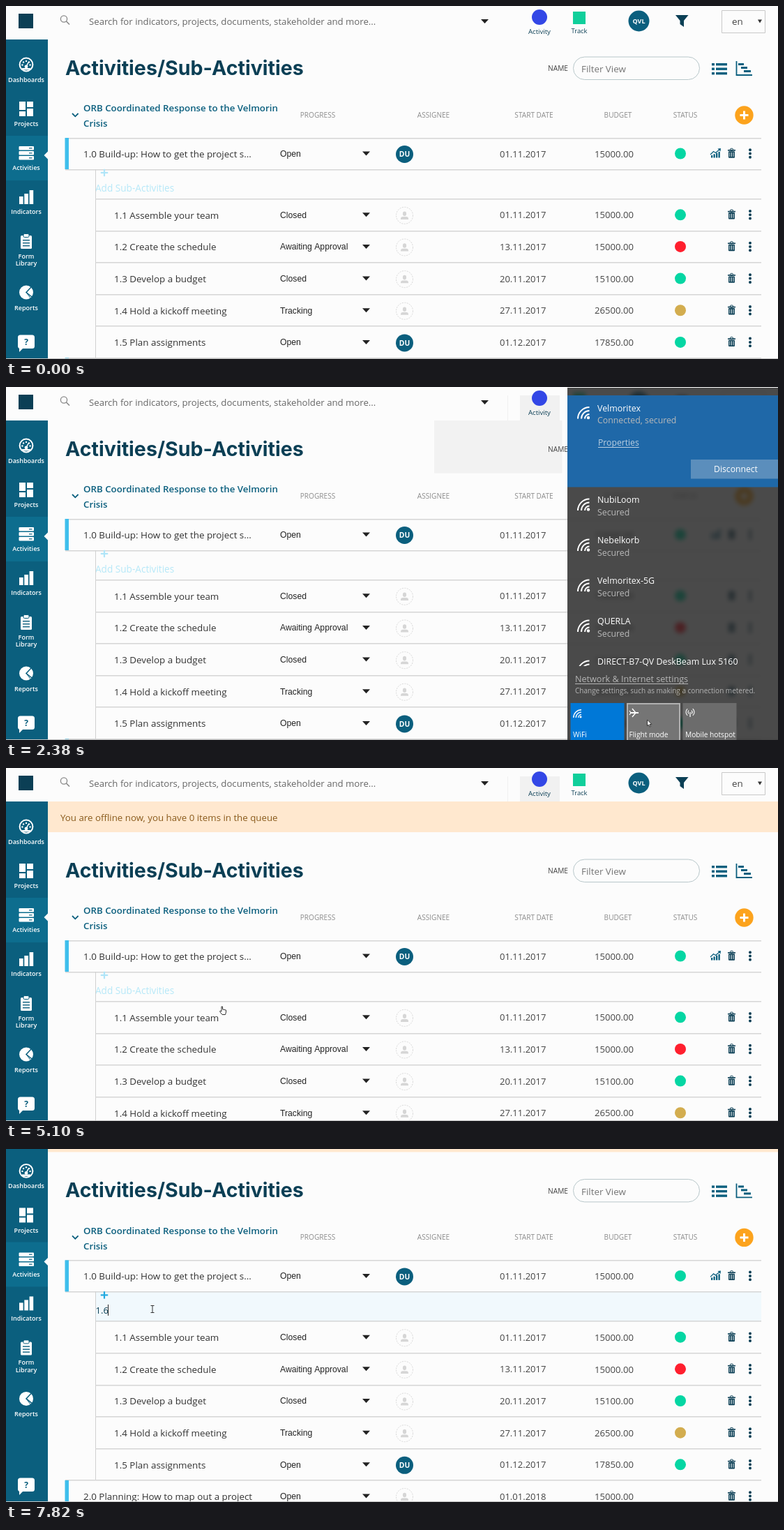
Recreate the animation shown at these times as an HTML page with a canvas. Size 1107 by 506 pixels, loop 8 s.

```html
<!DOCTYPE html>
<html lang="en">
<head>
<meta charset="utf-8">
<title>Activities</title>
<style>
html, body { margin: 0; width: 100%; height: 100%; overflow: hidden; background: #fcfcfc; }
canvas { display: block; }
</style>
</head>
<body>
<canvas id="stage" width="1107" height="506"></canvas>
<script>
const stage = document.getElementById('stage');
const c = stage.getContext('2d');
const SANS = '"Open Sans", "Noto Sans", sans-serif';
const ARIAL = '"Liberation Sans", Arial, sans-serif';
const TEAL = '#0b5f7e', NAVY = '#0b3f55', BG = '#fcfcfc', INK = '#333';
const GREEN = '#05d6a3', RED = '#ff1f2e', GOLD = '#d3ad4f';

// ---------- drawing helpers ----------
function rect(x, y, w, h, color) {
  c.fillStyle = color;
  c.fillRect(x, y, w, h);
}
function disc(x, y, r, color) {
  c.fillStyle = color;
  c.beginPath();
  c.arc(x, y, r, 0, 7);
  c.fill();
}
function ring(x, y, r, color, width = 1, from = 0, to = 2 * Math.PI) {
  c.strokeStyle = color;
  c.lineWidth = width;
  c.beginPath();
  c.arc(x, y, r, from, to);
  c.stroke();
}
function trace(points, x = 0, y = 0, k = 1) {
  c.beginPath();
  for (let i = 0; i < points.length; i += 2) c.lineTo(x + points[i] * k, y + points[i + 1] * k);
}
function poly(points, color, x, y, k) {
  trace(points, x, y, k);
  c.closePath();
  c.fillStyle = color;
  c.fill();
}
function line(points, color, width, x, y) {
  trace(points, x, y);
  c.strokeStyle = color;
  c.lineWidth = width;
  c.stroke();
}
function box(x, y, w, h, r, fill, stroke) {
  c.beginPath();
  c.roundRect(x, y, w, h, r);
  if (fill) { c.fillStyle = fill; c.fill(); }
  if (stroke) { c.strokeStyle = stroke; c.lineWidth = 1; c.stroke(); }
}
// y is the middle of the capitals
function text(s, x, y, size, color, weight = 400, align = 'left', font = SANS) {
  c.font = `${weight} ${size}px ${font}`;
  c.textAlign = align;
  c.fillStyle = color;
  c.fillText(s, x, y + size * .355);
}
function plus(x, y, r, color, width) {
  line([-r, 0, r, 0], color, width, x, y);
  line([0, -r, 0, r], color, width, x, y);
}
function badge(label, x, y, r, size) {
  disc(x, y, r, TEAL);
  text(label, x, y, size, '#fff', 700, 'center');
}
function underlined(s, x, y, size, color) {
  text(s, x, y, size, color);
  rect(x, Math.round(y + 6), c.measureText(s).width, 1, color);
}

// ---------- page ----------
function header(y, hover) {
  rect(0, y, 1107, 48, BG);
  rect(18, y + 11, 21, 21, NAVY);
  ring(83, y + 18.5, 4.6, '#888', 1.3);
  line([86.5, 22, 91, 26.5], '#888', 1.6, 0, y);
  text('Search for indicators, projects, documents, stakeholder and more...', 119, y + 22.5, 13.2, '#666');
  poly([681, 19, 692, 19, 686.5, 25], '#222', 0, y);
  if (hover) {
    rect(719, y + 12, 1, 36, '#f0f0f0');
    rect(737, y + 12, 57, 36, '#f1f1f1');
  }
  disc(765, y + 16, 11, '#3347e6');
  text('Activity', 765, y + 36.5, 9.6, NAVY, 400, 'center');
  rect(813, y + 8, 18, 18, '#10cf9b');
  text('Track', 822, y + 36, 9.4, NAVY, 400, 'center');
  badge('QVL', 907.5, y + 21.5, 15, 9);
  poly([960, 13, 978.5, 13, 972, 21, 972, 30, 966.5, 26, 966.5, 21], NAVY, 0, y);
  box(1026.5, y + 6.5, 62, 32, 0, null, '#c8c8c8');
  text('en', 1041, y + 22.5, 13.4, '#444');
  poly([1078, 19.5, 1084, 19.5, 1081, 24.5], '#333', 0, y);
}

function sidebar(y) {
  rect(0, Math.max(0, y + 48), 60, 506, TEAL);
  rect(0, y + 186, 60, 64, '#0d6d8e');
  poly([60, 208.5, 60, 219.5, 54.5, 214], BG, 0, y);
  const W = '#fff';
  ring(29, y + 84, 9.4, W, 2);
  for (let i = 0; i < 5; i++) {
    const a = Math.PI * (1 + i / 4);
    disc(29 + 5.6 * Math.cos(a), y + 84.5 + 5.6 * Math.sin(a), 1.2, W);
  }
  line([29, 87, 32, 81], W, 1.6, 0, y);
  disc(29, y + 87, 2.4, W);
  rect(23, y + 89, 12, 2.5, W);

  rect(19, y + 137, 9, 12, W);
  rect(30, y + 137, 9, 8, W);
  rect(19, y + 151, 9, 7, W);
  rect(30, y + 147, 9, 11, W);

  for (let i = 0; i < 3; i++) {
    box(18.5, y + 201 + i * 7, 21.5, 5.6, 1, W);
    rect(33, y + 203.2 + i * 7, 4.5, 1.2, TEAL);
  }

  rect(19, y + 273, 5.6, 11, W);
  rect(26.3, y + 269, 5.6, 15, W);
  rect(33.6, y + 264, 5.6, 20, W);

  box(21, y + 329, 16, 19, 1.5, W);
  box(25, y + 326.5, 8, 5, 1.5, W, TEAL);
  for (let i = 0; i < 3; i++) rect(24, y + 335 + i * 4, 10, 1.4, TEAL);

  disc(29, y + 410.5, 10, W);
  line([36, 403, 29, 410.5, 37, 417], TEAL, 1.5, 0, y);
  line([29, 410.5, 35, 418.5], TEAL, 1, 0, y);

  const labels = [['Dashboards', 105.5], ['Projects', 169], ['Activities', 232], ['Indicators', 295],
    ['Form', 358.5], ['Library', 369], ['Reports', 432.5]];
  for (const [s, at] of labels) text(s, 29, y + at, 9, W, 600, 'center');

  box(17, 471.5, 24, 19.5, 3.5, W);
  poly([19, 489, 26, 489, 19, 496], W);
  text('?', 29, 481.5, 12, TEAL, 700, 'center');
}

function trash(x, y) {
  rect(x - 5.5, y - 5, 11, 1.6, NAVY);
  box(x - 2, y - 6.7, 4, 3, 1, null, NAVY);
  box(x - 4.5, y - 2.7, 9, 9.4, 1, NAVY);
  for (let i = -1; i < 2; i++) rect(x + i * 2.6 - .5, y - 1.2, 1, 6.3, '#dfe6e9');
}
function nobody(x, y) {
  c.setLineDash([2, 1.5]);
  ring(x, y, 12, '#d8d8d8');
  c.setLineDash([]);
  c.fillStyle = '#d6d6d6';
  c.beginPath();
  c.ellipse(x, y - 2.5, 2.6, 3.3, 0, 0, 7);
  c.fill();
  box(x - 5.5, y + 1.8, 11, 3.8, [3, 3, 0, 0], '#d6d6d6');
}
function row(y, x, name, progress, date, budget, status, owned) {
  text(name, x, y, 13.4, INK);
  text(progress, 393, y - .4, 12.2, '#222', 400, 'left', ARIAL);
  poly([511, -3.5, 522, -3.5, 516.5, 2.5], '#222', 0, y);
  if (owned) badge('DU', 571.5, y + .5, 12.5, 10.3);
  else nobody(571.5, y + .5);
  text(date, 708, y, 13, '#444');
  text(budget, 844, y, 13.1, '#444');
  if (status) disc(967, y - .5, 8, status);
  trash(1040.5, y - 1);
  for (let i = -1; i < 2; i++) disc(1067, y - .5 + i * 5.3, 2, NAVY);
}

const subs = [
  ['1.1 Assemble your team', 'Closed', '01.11.2017', '15000.00', GREEN],
  ['1.2 Create the schedule', 'Awaiting Approval', '13.11.2017', '15000.00', RED],
  ['1.3 Develop a budget', 'Closed', '20.11.2017', '15100.00', GREEN],
  ['1.4 Hold a kickoff meeting', 'Tracking', '27.11.2017', '26500.00', GOLD],
  ['1.5 Plan assignments', 'Open', '01.12.2017', '17850.00', GREEN, true]
];

function content(y, n) {
  const rule = (x, at) => rect(x, Math.round(y + at), 1083 - x, 1.5, '#d6d6d6');
  text('Activities/Sub-Activities', 85, y + 88.5, 28.6, NAVY, 700, 'left', 'Inter, sans-serif');
  text('NAME', 777, y + 89.5, 10.2, '#444');
  box(813.5, y + 73, 181, 32.5, 16.2, BG, '#b8c7ca');
  text('Filter View', 825, y + 90.5, 13.4, '#757575');
  for (let i = 0; i < 3; i++) {
    rect(1012, y + 82 + i * 6.5, 4, 3.4, TEAL);
    rect(1018, y + 82 + i * 6.5, 16, 3.4, TEAL);
  }
  line([1047.5, 79, 1047.5, 99, 1070, 99], TEAL, 1.8, 0, y);
  for (let i = 0; i < 3; i++) rect(1050 + i * 4, y + 82 + i * 5, 8 + i, 3, TEAL);

  line([95, 154, 99.3, 158.3, 103.6, 154], TEAL, 1.8, 0, y);
  text('ORB Coordinated Response to the Velmorin', 111, y + 146.5, 13.3, TEAL, 600);
  text('Crisis', 111, y + 168.5, 13.3, TEAL, 600);
  const heads = [['PROGRESS', 447], ['ASSIGNEE', 613], ['START DATE', 757], ['BUDGET', 877.5], ['STATUS', 974]];
  for (const [s, x] of heads) text(s, x, y + 156.5, 10.1, '#8c8c8c', 400, 'center');
  disc(1058.5, y + 156.5, 13.2, '#fca31d');
  plus(1058.5, y + 156.5, 6, '#fff', 3);

  rule(85, 188.5);
  row(y + 212, 111, '1.0 Build-up: How to get the project s...', 'Open', '01.11.2017', '15000.00', GREEN, true);
  for (let i = 0; i < 4; i++) rect(1011 + i * 3.5, y + 214 - i * 1.7, 2.3, 3.5 + i * 1.7, TEAL);
  line([1010, 213, 1014.5, 208.5, 1017.5, 210.5, 1024, 205], TEAL, 1.3, 0, y);
  poly([1020.5, 204.5, 1025, 204, 1024.5, 208.5], TEAL, 0, y);

  // new sub-activity field
  const active = n >= 20;
  if (active) rect(128, y + 234, 955, 43, '#f1f9fd');
  rule(85, 233.5);
  plus(141, y + 239, 5.2, active ? '#22a9e0' : '#b0e5f8', 2.2);
  const typed = n < 22 ? '' : n < 23 ? '1.' : '1.6';
  if (typed) text(typed, 128.5, y + 261, 13, NAVY);
  else text('Add Sub-Activities', 128, y + 261, 13.6, active ? '#7fcdec' : '#b6e8f8');
  if (n >= 21) rect([128.5, 138.5, 146][n - 21], y + 252.5, 1, 16, '#222');

  rect(128, y + 234, 1, 270.5, '#d0d0d0');
  subs.forEach((s, i) => {
    rule(128, 276 + i * 45.6);
    row(y + 299.8 + i * 45.65, 155, ...s);
  });
  rule(85, 504);
  row(y + 527.6, 111, '2.0 Planning: How to map out a project', 'Open', '01.01.2018', '15000.00');
  rect(84.5, y + 189, 5.5, 45, '#3fbfec');
  rect(84.5, y + 504.5, 5.5, 45, '#3fbfec');

  const held = n == 13 ? 1 : n == 17 || n == 18 ? 0 : -1;
  if (held >= 0) for (let i = 0; i < 6; i++)
    rect(139.5 + i % 2 * 5, y + 293.5 + held * 45.6 + (i >> 1) * 5, 3.4, 3.4, '#999');
}

// ---------- network flyout ----------
function wifi(x, y, k = 1) {
  for (const r of [6.5, 11.5, 16.5]) ring(x, y, r * k, '#fff', 2 * k, Math.PI, 1.5 * Math.PI);
  disc(x - 1.5 * k, y - 1.5 * k, 2.2 * k, '#fff');
}
function plane(x, y) {
  line([-6, 0, 6, 0], '#fff', 2, x, y);
  line([-3, -6, 2, 0, -3, 6], '#fff', 1.4, x, y);
  line([-7, -3, -5, 0, -7, 3], '#fff', 1.2, x, y);
}
function tile(x, label, color, hover) {
  rect(x, 453, 77, 53, color);
  if (hover) { c.strokeStyle = '#b0b0b0'; c.lineWidth = 2; c.strokeRect(x + 1, 454, 75, 53); }
  text(label, x + 3.5, 498.5, 10.2, '#fff');
}
function network(name, note, y) {
  wifi(836.5, y + 15);
  text(name, 848, y, 12.4, '#fff');
  text(note, 848, y + 17.5, 12.3, '#b9b9b9');
}

const [A, B, G, P, Q] = ['NubiLoom', 'Nebelkorb', 'Velmoritex-5G', 'QUERLA', 'DIRECT-B7-QV DeskBeam Lux 5160'];
const found = { 4: [A, B, P], 5: [A, B, P, G], 6: [A, B, G, Q, P], 7: [A, B, G, P, Q] };

function flyout(n) {
  const top = n == 3 ? 11 : n < 8 ? 1 : 325;
  c.save();
  c.beginPath();
  c.rect(805, top, 302, 506);
  c.clip();
  c.filter = 'blur(3px)';
  c.drawImage(stage, 0, 0);
  c.filter = 'none';
  rect(805, top, 302, 506, n == 3 ? 'rgba(21,21,21,.76)' : 'rgba(34,34,34,.81)');
  c.restore();
  if (n == 3) {
    disc(832.5, 23.5, 1.8, '#1a83e0');
    return;
  }
  const off = n >= 8;
  if (off) {
    plane(828, 354);
    text('Flight mode', 848, 346, 12.4, '#fff');
    text('On', 848, 363.5, 12.3, '#b9b9b9');
  } else {
    rect(805, 12, 302, 131.5, '#1f68a8');
    network('Velmoritex', 'Connected, secured', 30.5);
    underlined('Properties', 849, 79.5, 12.2, '#bcd0e2');
    rect(982, 104, 125, 27.5, '#5b8ebc');
    text('Disconnect', 1046.5, 118, 12.2, '#fff', 400, 'center');
    c.save();
    c.beginPath();
    c.rect(805, 144, 302, 256);
    c.clip();
    found[n].forEach((name, i) => network(name, 'Secured', 162 + i * 58));
    c.restore();
  }
  underlined('Network & Internet settings', 816, 419, 12.6, '#b5b5b5');
  text('Change settings, such as making a connection metered.', 816, 435.5, 10, '#b5b5b5');
  tile(809.5, 'WiFi', off ? '#6c6c6c' : '#0078d7');
  tile(890, 'Flight mode', off ? '#0078d7' : '#757575', n >= 7 && n < 10);
  tile(970.5, 'Mobile hotspot', '#6c6c6c');
  wifi(825, 474, .68);
  plane(901, 467);
  for (const r of [3, 6]) {
    ring(981, 466, r, '#fff', 1.1, -.9, .9);
    ring(981, 466, r, '#fff', 1.1, 2.24, 4.04);
  }
  rect(980.4, 466, 1.2, 7, '#fff');
}

// ---------- pointer ----------
function shape(points, x, y, k) {
  trace(points, x, y, k);
  c.closePath();
  c.fillStyle = '#fff';
  c.fill();
  c.strokeStyle = '#333';
  c.lineWidth = 1;
  c.stroke();
}
const pointers = {
  arrow: (x, y, k = .68) => shape([0, 0, 0, 13, 3, 10.3, 5.2, 15, 7.3, 14, 5.2, 9.5, 9.3, 9.3], x, y, k),
  busy(x, y) {
    pointers.arrow(x + 1, y + 1, 1);
    ring(x + 13, y + 1, 5, '#1e90ea', 3);
  },
  hand: (x, y) => shape([3, 1, 4.5, 1, 4.7, 5, 9.5, 6, 9.5, 9, 8.5, 12.5, 4, 12.5, .8, 8.5, 1, 7, 3, 8], x, y, 1),
  beam(x, y) {
    line([-2.5, 0, 2.5, 0], '#333', 1, x, y + .5);
    line([0, 0, 0, 11], '#333', 1, x, y);
    line([-2.5, 11, 2.5, 11], '#333', 1, x, y - .5);
  }
};
// [first step, pointer, x, y]
const path = [
  [1, 'arrow', 612.5, 329], [2, 'arrow', 615, 329], [5, 'arrow', 960, 372], [7, 'arrow', 919.5, 477],
  [8, 'arrow', 919.5, 480], [9, 'arrow', 887, 490], [10, 'busy', 540, 336], [13, 'hand', 384, 395],
  [14, 'beam', 228, 313], [15, 'hand', 306, 341], [17, 'hand', 306, 344], [18, 'hand', 303, 342],
  [19, 'beam', 210, 224]
];

function draw(t) {
  let n = Math.floor(t / 340);
  if (n == 14 && t < 4770) n = 13;
  const banner = n >= 12 ? 58 : 0;
  const scroll = n < 16 ? 0 : n == 16 ? 66 : 87.6;

  rect(0, 0, 1107, 506, BG);
  if (n >= 5 && n < 12) rect(614, 48, 183.5, 75.5, '#f2f2f2');
  content(banner - scroll, n);
  header(-scroll, n >= 5);
  if (banner) {
    rect(60, 48 - scroll, 1047, 44, '#ffe8cf');
    text('You are offline now, you have 0 items in the queue', 78, 71.5 - scroll, 13.3, '#8a5a1c');
  }
  sidebar(-Math.min(scroll, 52.6));
  rect(0, 505, 1107, 1, '#c0c0c0');
  if (n >= 3 && n < 11) flyout(n);
  const spot = path.filter(p => p[0] <= n).pop();
  if (spot) pointers[spot[1]](spot[2], spot[3]);
}

function tick() {
  draw(performance.now() % 8000);
  requestAnimationFrame(tick);
}
tick();
</script>
</body>
</html>
```
